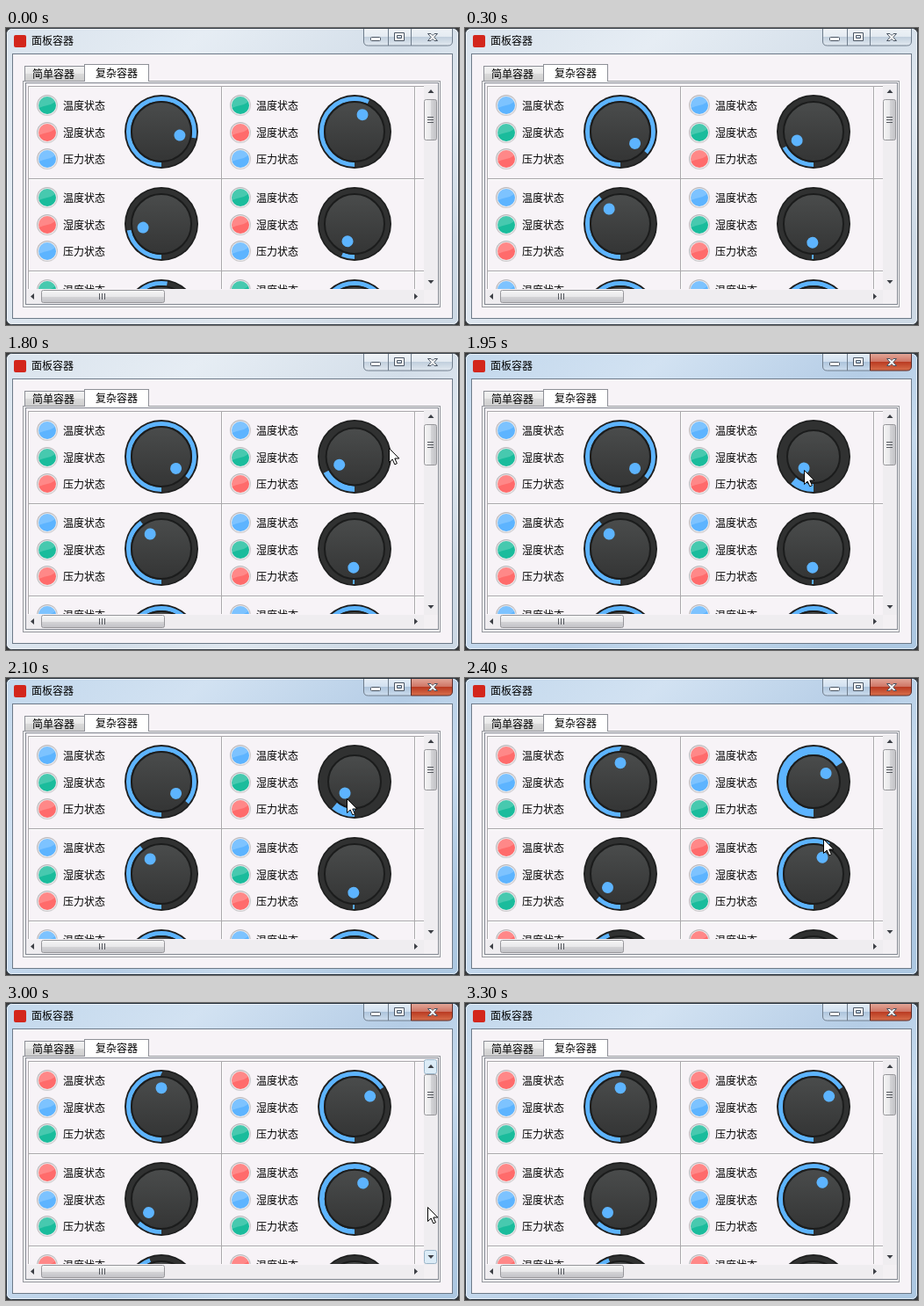
Write an HTML page that moves like this. It is 516 px wide and 338 px high and loops after 3450 ms.

```html
<!DOCTYPE html>
<html lang="zh-CN">
<head>
<meta charset="utf-8">
<title>面板容器</title>
<style>
  html, body { margin: 0; width: 100%; height: 100%; overflow: hidden; background: #383838; }
  svg { display: block; width: 516px; height: 338px; }
  text { font: 12px "Noto Sans CJK SC", "Noto Sans CJK", sans-serif; fill: #000; }
  .crisp { shape-rendering: crispEdges; }
</style>
</head>
<body>
<svg id="stage" viewBox="0 0 516 338">
  <defs>
    <linearGradient id="idle" x2="1" y2=".7">
      <stop stop-color="#d9e3ed"/><stop offset=".3" stop-color="#e6edf4"/>
      <stop offset=".62" stop-color="#d3dee9"/><stop offset=".8" stop-color="#dfe7ef"/>
      <stop offset="1" stop-color="#cdd9e5"/>
    </linearGradient>
    <linearGradient id="active" x2="1" y2=".7">
      <stop stop-color="#c3d8ec"/><stop offset=".3" stop-color="#d2e2f2"/>
      <stop offset=".62" stop-color="#b5cde6"/><stop offset=".8" stop-color="#c6daed"/>
      <stop offset="1" stop-color="#adc8e2"/>
    </linearGradient>
    <linearGradient id="red" x2="0" y2="1">
      <stop stop-color="#e2a597"/><stop offset=".45" stop-color="#cf7767"/>
      <stop offset=".46" stop-color="#b8371f"/><stop offset="1" stop-color="#d9704c"/>
    </linearGradient>
    <linearGradient id="glass" x2="0" y2="1">
      <stop stop-color="#fff" stop-opacity=".6"/><stop offset=".45" stop-color="#fff" stop-opacity=".35"/>
      <stop offset=".46" stop-color="#8ba3bb" stop-opacity=".3"/><stop offset="1" stop-color="#fff" stop-opacity=".3"/>
    </linearGradient>
    <linearGradient id="tab" x2="0" y2="1">
      <stop stop-color="#f3f3f3"/><stop offset=".5" stop-color="#e9e9e9"/>
      <stop offset=".51" stop-color="#dadada"/><stop offset="1" stop-color="#cdcdcd"/>
    </linearGradient>
    <linearGradient id="thumbV">
      <stop stop-color="#f6f6f6"/><stop offset=".5" stop-color="#e8e8ea"/>
      <stop offset=".51" stop-color="#d5d5d8"/><stop offset="1" stop-color="#c2c2c6"/>
    </linearGradient>
    <linearGradient id="thumbH" href="#thumbV" x2="0" y2="1"/>
    <linearGradient id="knob" x2="0" y2="1">
      <stop stop-color="#4a4c4c"/><stop offset="1" stop-color="#343535"/>
    </linearGradient>
    <linearGradient id="rim" x2=".7" y2="1">
      <stop stop-color="#b4b2b5"/><stop offset="1" stop-color="#d2d0d2"/>
    </linearGradient>
    <clipPath id="view"><rect x="24" y="65" width="452" height="232"/></clipPath>
  </defs>

  <rect x=".5" y=".5" width="515" height="337" rx="6" fill="url(#idle)" stroke="#3d4650"/>
  <rect id="activeFrame" x=".5" y=".5" width="515" height="337" rx="6" fill="url(#active)" stroke="#26323e"/>
  <rect x="1.5" y="1.5" width="513" height="335" rx="5" fill="none" stroke="#fff" stroke-opacity=".65"/>
  <rect x="9" y="8" width="14" height="14" rx="2" fill="#d3261c"/>
  <text x="29" y="19">面板容器</text>

  <g stroke="#6f7d8c">
    <path d="M407.5 1v14q0 5 5 5H461.500V1M435.500 1v19" fill="url(#glass)"/>
    <path id="closeIdle" d="M461.500 1v19h42q5 0 5-5V1" fill="url(#glass)"/>
    <path id="closeActive" d="M461.500 1v19h42q5 0 5-5V1" fill="url(#red)" stroke="#5a2a26"/>
  </g>
  <g fill="#fff" stroke="#4a5563">
    <rect x="415.500" y="10.500" width="11" height="4" rx="1"/>
    <path fill-rule="evenodd" d="M442.500 5.500h11v9h-11zm3 3v3h5v-3z"/>
    <path d="M480.500 6.500h3.500l2 2 2-2h3.500l-3.700 4 3.700 4h-3.500l-2-2-2 2h-3.500l3.700-4z"/>
  </g>

  <g class="crisp">
    <rect x="7.5" y="29.5" width="501" height="301" fill="#f7f3f7" stroke="#6d7a88"/>
    <rect x="19.500" y="60.500" width="475" height="257" fill="#fbf9fb" stroke="#94979c"/>
    <rect x="22.500" y="62.500" width="470" height="252" fill="#f7f3f7" stroke="#828790"/>
    <rect x="21.500" y="43.500" width="68" height="17" fill="url(#tab)" stroke="#8e9097"/>
    <path d="M89.500 61V41.500H162.500V61" fill="#fff" stroke="#8e9097"/>
    <path d="M90 60.500H162" stroke="#fff"/>
  </g>
  <text x="30" y="57">简单容器</text>
  <text x="102" y="56">复杂容器</text>

  <g id="cells" clip-path="url(#view)"></g>

  <g class="crisp">
    <rect x="476" y="64" width="16" height="234" fill="#efedf0"/>
    <rect x="23" y="298" width="453" height="16" fill="#efedf0"/>
    <rect x="476" y="298" width="16" height="16" fill="#f3f0f3"/>
  </g>
  <g id="hot" fill="#dcecf7" stroke="#9bb5c9">
    <rect x="476.500" y="64.500" width="14" height="16" rx="2"/>
    <rect x="476.500" y="281.500" width="14" height="15" rx="2"/>
  </g>
  <g stroke="#96969a">
    <rect x="476.500" y="81.500" width="14" height="46" rx="2" fill="url(#thumbV)"/>
    <rect x="40.500" y="298.500" width="140" height="14" rx="2" fill="url(#thumbH)"/>
  </g>
  <path class="crisp" d="M480 101.500h7m-7 3h7m-7 3h7M106.500 302v7m3-7v7m3-7v7" stroke="#55585e"/>
  <path d="M480.500 74l3.500-4 3.500 4zM480.500 287l3.500 4 3.500-4zM32 302l-4 3.500 4 3.500zM465 302l4 3.500-4 3.500z" fill="#3c3f45"/>

  <path id="cursor" d="M.5 .5V16.500l3.700-3.500 2.600 5.800 2.600-1.100-2.600-5.700h5z" fill="#fff" stroke="#000"/>
</svg>

<script>
const LOOP = 3450;
const GREEN = '#1abc9c', RED = '#ff6b6b', BLUE = '#5db4ff';
const byId = id => document.getElementById(id);
const lerp = (a, b, k) => a + (b - a) * k;

function add(parent, tag, attrs, content) {
  const el = document.createElementNS('http://www.w3.org/2000/svg', tag);
  setAttrs(el, attrs);
  if (content) el.textContent = content;
  return parent.appendChild(el);
}
function setAttrs(el, attrs) {
  for (const name in attrs) el.setAttribute(name, attrs[name]);
}

// Sensor readings: lamp colours and dial angles, clockwise from the bottom.
const readings = [
  { at: 0, lamps: [GREEN, RED, BLUE], dials: [281, 205, 79, 22, 190, 240] },
  { at: 300, lamps: [BLUE, GREEN, RED], dials: [309, 62, 143, 3, 240, 240] },
  { at: 2250, lamps: [RED, BLUE, GREEN], dials: [180, 236, 43, 208, 160, 60] }
];

// Pointer steps; upper and lower are how far the right-hand dials are opened.
const pointer = [
  { at: 0 },
  { at: 1500, pos: [500, 64] },
  { at: 1650, pos: [480, 80] },
  { at: 1800, pos: [436, 108], upper: .4 },
  { at: 1950, pos: [386, 133], upper: 1 },
  { at: 2100, pos: [388, 137], upper: 1 },
  { at: 2250, pos: [400, 153], upper: 1 },
  { at: 2400, pos: [408, 183], upper: 1 },
  { at: 2550, pos: [408, 205], upper: .2, lower: .7 },
  { at: 2700, pos: [405, 222], lower: 1 },
  { at: 2850, pos: [436, 226], lower: 1 },
  { at: 3000, pos: [480, 232], lower: .2, hot: 1 },
  { at: 3150, hot: .4 },
  { at: 3300 }
];

function makeLamp(parent, x, y, label) {
  const g = add(parent, 'g', { transform: `translate(${x} ${y})` });
  add(g, 'circle', { r: 12, fill: 'url(#rim)' });
  add(g, 'circle', { r: 10.8, fill: '#eeecee' });
  const bulb = add(g, 'circle', { r: 10 });
  add(g, 'path', { d: 'M-9.500 3A10 10 0 0 1 9.200-4Q5-1 0 0T-9.500 3z', fill: '#fff', opacity: .2 });
  add(parent, 'text', { x: 65 - 47 + x, y: y + 5 }, label);
  return bulb;
}

function makeDial(parent, x, y) {
  const g = add(parent, 'g', { transform: `translate(${x} ${y})` });
  add(g, 'circle', { r: 42, fill: '#1d1e1e' });
  add(g, 'circle', { r: 40.3, fill: '#303131' });
  const arc = add(g, 'circle', { fill: 'none', stroke: BLUE, pathLength: 360, transform: 'rotate(90)' });
  const knob = add(g, 'circle', { fill: 'url(#knob)', stroke: '#1b1c1c', 'stroke-width': 2 });
  const dot = add(g, 'circle', { r: 6.5, fill: BLUE });
  return (angle, open = 0) => {
    const inner = lerp(35, 31, open);
    setAttrs(arc, { r: (40 + inner) / 2, 'stroke-width': 40 - inner, 'stroke-dasharray': `${angle} 360` });
    setAttrs(knob, { r: inner - 1 });
    setAttrs(dot, { cy: lerp(21.3, 17, open), transform: `rotate(${angle})` });
  };
}

const cells = byId('cells');
const lamps = [[], [], []], dials = [];
const gridPath = shift => [0, 1, 2].map(i =>
  `M${25.5 + 220 * i + shift} 66V298M25 ${66.5 + 105 * i + shift}H477`).join('');
add(cells, 'path', { d: gridPath(1), stroke: '#fff', class: 'crisp' });
add(cells, 'path', { d: gridPath(0), stroke: '#aaa8ab', class: 'crisp' });
for (let row = 0; row < 3; row++) {
  for (let col = 0; col < 2; col++) {
    const dx = col * 220, dy = row * 105;
    ['温度状态', '湿度状态', '压力状态'].forEach((label, i) =>
      lamps[i].push(makeLamp(cells, 47 + dx, [88, 119, 149][i] + dy, label)));
    dials.push(makeDial(cells, 177 + dx, 118 + dy));
  }
}

const current = (steps, t) => steps.findLast(s => s.at <= t);
const show = (id, opacity) => byId(id).setAttribute('opacity', opacity);

function draw(t) {
  const reading = current(readings, t);
  const step = current(pointer, t);
  const active = t >= 1950 ? 1 : 0;
  const dragged = t >= 1950 && t < 2250;

  lamps.forEach((group, i) => group.forEach(l => l.setAttribute('fill', reading.lamps[i])));
  dials.forEach((set, i) => set(
    i === 1 && dragged ? 40 : reading.dials[i],
    i === 1 ? step.upper : i === 3 ? step.lower : 0));

  show('activeFrame', active);
  show('closeActive', active);
  show('closeIdle', 1 - active);
  show('hot', step.hot || 0);
  show('cursor', step.pos ? 1 : 0);
  if (step.pos) byId('cursor').setAttribute('transform', `translate(${step.pos})`);
}

const start = performance.now();
function tick() {
  draw((performance.now() - start) % LOOP);
  requestAnimationFrame(tick);
}
tick();
</script>
</body>
</html>
```
